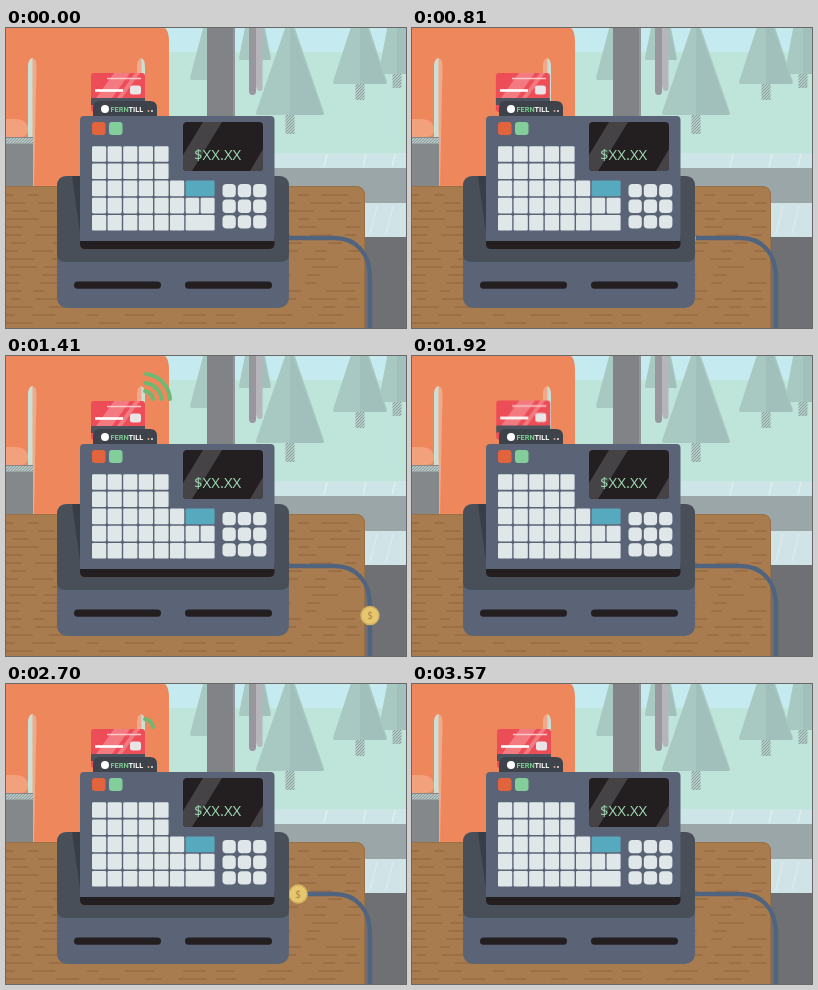
Animation of 400x300 px, one loop 3600 ms. Source, as an HTML page:

```html
<!DOCTYPE html>
<html lang="en">
<head>
<meta charset="utf-8">
<title>Cash register</title>
<style>
  html, body { margin: 0; width: 100%; height: 100%; overflow: hidden; }
  svg { display: block; width: 100vw; height: 100vh; }

  .slide, .lift, .coin, .wifi, .wifi path { animation: 1.8s linear infinite; }

  .slide { animation-name: slide; }
  .lift { animation-name: lift; }
  @keyframes slide {
    0%, 3% { transform: translateX(0); animation-timing-function: cubic-bezier(.8, 0, .3, 1); }
    27.8% { transform: translateX(-57px); animation-timing-function: ease; }
    48.9%, 100% { transform: translateX(0); }
  }
  @keyframes lift {
    0%, 3% { transform: translateY(0); animation-timing-function: cubic-bezier(.8, 0, .7, .6); }
    15% { transform: translateY(-14px); animation-timing-function: ease-in-out; }
    27.8%, 100% { transform: translateY(0); }
  }

  .coin {
    offset-path: path("M270 210H328C350 210 364 225 364 250V330");
    offset-rotate: 0deg;
    animation-name: roll;
  }
  @keyframes roll {
    0%, 43.9% { offset-distance: 0; }
    68.33% { offset-distance: 88px; }
    78.33% { offset-distance: 128px; }
    90%, 100% { offset-distance: 183px; }
  }

  .wifi { animation-name: gate; animation-timing-function: step-end; }
  .wifi path { opacity: 0; animation-name: wave; animation-timing-function: step-end; }
  .wifi path:nth-child(2) { animation-delay: 60ms; }
  .wifi path:nth-child(3) { animation-delay: 120ms; }
  @keyframes gate {
    0% { opacity: 0; }
    40% { opacity: 1; }
    97.5%, 100% { opacity: 0; }
  }
  @keyframes wave {
    0% { opacity: 0; }
    47% { opacity: 1; }
    60% { opacity: 0; }
    70%, 100% { opacity: 1; }
  }
</style>
</head>
<body>
<svg viewBox="0 0 400 300" preserveAspectRatio="none">
  <defs>
    <clipPath id="cardShape"><rect x="85" y="45" width="54" height="39" rx="3"/></clipPath>
    <clipPath id="screenShape"><rect x="177" y="94" width="80" height="49" rx="4"/></clipPath>
    <pattern id="hatch" width="3" height="3" patternUnits="userSpaceOnUse">
      <path d="M0 3L3 0" stroke="#7f9a98" stroke-width=".9"/>
    </pattern>
  </defs>

  <!-- outside -->
  <rect width="400" height="300" fill="#bfe4d9"/>
  <rect width="400" height="24" fill="#c5ebf0"/>
  <g id="trees" stroke-width="4" stroke-linejoin="round"></g>
  <rect y="125" width="400" height="16" fill="#cee5e8"/>
  <path d="M318 139l3-13M357 139l3-13M386 139l3-13" stroke="#dceef0" stroke-width="1.5"/>
  <rect y="140" width="400" height="36" fill="#9aa6a7"/>
  <rect y="175" width="400" height="34" fill="#d0e4e8"/>
  <path d="M364 206l7-28M380 206l7-28" stroke="#d9eaed" stroke-width="1.5"/>
  <rect y="209" width="400" height="91" fill="#6f7073"/>
  <rect x="201" width="28" height="160" fill="#818386"/>
  <rect x="227" width="2" height="160" fill="#929698"/>
  <path d="M243 0H250V63Q250 67 246.500 67Q243 67 243 63Z" fill="#98979d"/>
  <path d="M250 0H256.500V60Q256.500 63 253.500 63Q251 63 250 58Z" fill="#b6b5bc"/>

  <!-- customer -->
  <path d="M0 0H159Q163 3 163 14V158H0Z" fill="#ee885c"/>
  <path d="M22 158V38Q22.500 30 27 30V158Z" fill="#cbdfd5"/>
  <path d="M26.500 158V30Q31 31 30.500 40L28 158Z" fill="#f0a98a"/>
  <rect y="109" width="27" height="50" fill="#85888b"/>
  <rect y="110" width="27" height="5.500" fill="#b9c4c3"/>
  <rect y="110" width="27" height="5.500" fill="url(#hatch)"/>
  <path d="M135 90V30Q139 31 139 39V90Z" fill="#cbdfd5"/>
  <path d="M131 90V38Q131 31 135.500 30V90Z" fill="#f0a98a"/>
  <path d="M0 91H10Q22 92 22 102Q22 109 14 109H0Z" fill="#f2a17c"/>

  <!-- counter -->
  <path d="M0 158H350Q359 158 359 168V300H0Z" fill="#a97c50"/>
  <path d="M0 158.500H350Q358.500 158.500 358.500 168V300" fill="none" stroke="#9a6f45"/>
  <g id="grain" stroke="#956b43" stroke-width="1.3" stroke-linecap="round"></g>

  <path d="M282 210H328C350 210 364 225 364 250V302" fill="none" stroke="#50647f" stroke-width="4.4"/>
  <g class="coin">
    <circle r="9" fill="#e6c66f" stroke="#d4b160" stroke-width="1.4"/>
    <text y="3.6" text-anchor="middle" font-family="'Open Sans', sans-serif" font-size="10" fill="#a98847">$</text>
  </g>

  <g class="slide"><g class="lift">
    <g clip-path="url(#cardShape)">
      <rect x="85" y="45" width="54" height="39" fill="#ec4d56"/>
      <path d="M108 45H124L106 70H90Z M129 45H134L116 70H111Z" fill="#f27a80"/>
      <path d="M101 50.500H135" stroke="#f9c6c9" stroke-width="1.4"/>
      <path d="M89 62.500H117" stroke="#fff" stroke-width="2.6"/>
      <rect x="124" y="57.500" width="11" height="9" rx="2.500" fill="#e9e4e6"/>
      <rect x="85" y="70" width="54" height="7" fill="#4d525f"/>
    </g>
  </g></g>

  <g class="wifi" fill="none" stroke="#70b772" stroke-width="4" stroke-linecap="round">
    <path d="M139 35A10 10 0 0 1 147 43"/>
    <path d="M139 27A18 18 0 0 1 155.500 43"/>
    <path d="M140 18A27 27 0 0 1 164 43"/>
  </g>

  <!-- register -->
  <path d="M87 89V80Q87 73 94 73H144Q151 73 151 80V89Z" fill="#3d424b"/>
  <circle cx="99" cy="81" r="4" fill="#fff"/>
  <text x="104.500" y="83.600" font-family="Roboto, sans-serif" font-weight="700" font-size="7.4" fill="#7cc98f">FERN<tspan fill="#fff">TILL</tspan></text>
  <circle cx="142.500" cy="83" r="1" fill="#e2a07e"/>
  <circle cx="146" cy="83" r="1" fill="#dfe6ea"/>

  <rect x="51" y="148" width="232" height="132" rx="10" fill="#5b6477"/>
  <path d="M51 226V158Q51 148 61 148H273Q283 148 283 158V226Q283 234 275 234H59Q51 234 51 226Z" fill="#494f59"/>
  <path d="M66 148H75V212Z" fill="#383d46"/>
  <path d="M74 208H268.500V216Q268.500 221 263 221H79Q74 221 74 216Z" fill="#231f20"/>
  <path d="M74 213V92Q74 88 78 88H264.500Q268.500 88 268.500 92V213Z" fill="#5b6477"/>
  <rect x="68" y="253.500" width="87" height="7.300" rx="3.500" fill="#231f20"/>
  <rect x="179" y="253.500" width="87" height="7.300" rx="3.500" fill="#231f20"/>
  <rect x="86" y="94" width="13.500" height="13" rx="3" fill="#e1643c"/>
  <rect x="103" y="94" width="13.500" height="13" rx="3" fill="#83cf9b"/>

  <g clip-path="url(#screenShape)">
    <rect x="177" y="94" width="80" height="49" fill="#231f20"/>
    <path d="M197 94H216L186 143H177V127Z M257 121V143H244Z" fill="#464346"/>
  </g>
  <text x="188" y="131.700" font-family="'Open Sans', sans-serif" font-size="15" fill="#9dd9b3">$XX.XX</text>
  <g id="keys"></g>
</svg>

<script>
  const add = (id, tag, attrs) => {
    const el = document.createElementNS('http://www.w3.org/2000/svg', tag);
    for (const k in attrs) el.setAttribute(k, attrs[k]);
    document.getElementById(id).append(el);
  };

  // apex x, apex y, half width, base y, trunk height
  const trees = [[205, -22, 19, 50, 0], [249, -40, 14, 30, 0], [391, -42, 16, 44, 15],
    [354, -22, 25, 54, 17], [284, -8, 32, 85, 20]];
  for (const [x, y, w, base, trunk] of trees) {
    if (trunk) {
      const box = { x: x - 4.5, y: base, width: 9, height: trunk + 1 };
      add('trees', 'rect', { ...box, fill: '#b4cbc6' });
      add('trees', 'rect', { ...box, fill: 'url(#hatch)' });
    }
    const light = '#a8c9c2', shade = '#a2c0bb';
    add('trees', 'path', { d: `M${x} ${y}L${x + w} ${base}H${x - w}Z`, fill: light, stroke: light });
    add('trees', 'path', { d: `M${x} ${y}L${x + w + 1} ${base}Q${x + w + 2} ${base + 2} ${x + w} ${base + 2}H${x}Z`, fill: shade });
  }

  let seed = 11;
  const rnd = () => (seed = seed * 16807 % 2147483647) / 2147483647;
  for (let y = 167; y < 300; y += 8) {
    for (let x = rnd() * 20 - 12; x < 345;) {
      const end = Math.min(x + 8 + rnd() * 24, 354);
      add('grain', 'path', { d: `M${x.toFixed(1)} ${y}H${end.toFixed(1)}` });
      x = end + 8 + rnd() * 26;
    }
  }

  const key = (x, y, width, height, rx, fill = '#dfe7e8') =>
    add('keys', 'rect', { x, y, width, height, rx, fill });
  const colX = c => 86 + c * 15.6, rowY = r => 118.2 + r * 17.2;
  [5, 5, 6, 6, 6].forEach((n, r) => {
    for (let c = 0; c < n; c++) key(colX(c), rowY(r), 14.2, 15.6, 1.3);
  });
  key(colX(6), rowY(2), 29, 15.6, 1.3, '#57aabd');
  key(colX(6), rowY(3), 13.6, 15.6, 1.3);
  key(colX(6) + 15, rowY(3), 14, 15.6, 1.3);
  key(colX(6), rowY(4), 29, 15.6, 1.3);
  for (let i = 0; i < 9; i++)
    key(216.5 + i % 3 * 15.3, 156 + Math.floor(i / 3) * 15.6, 13.3, 13.3, 4);
</script>
</body>
</html>
```
